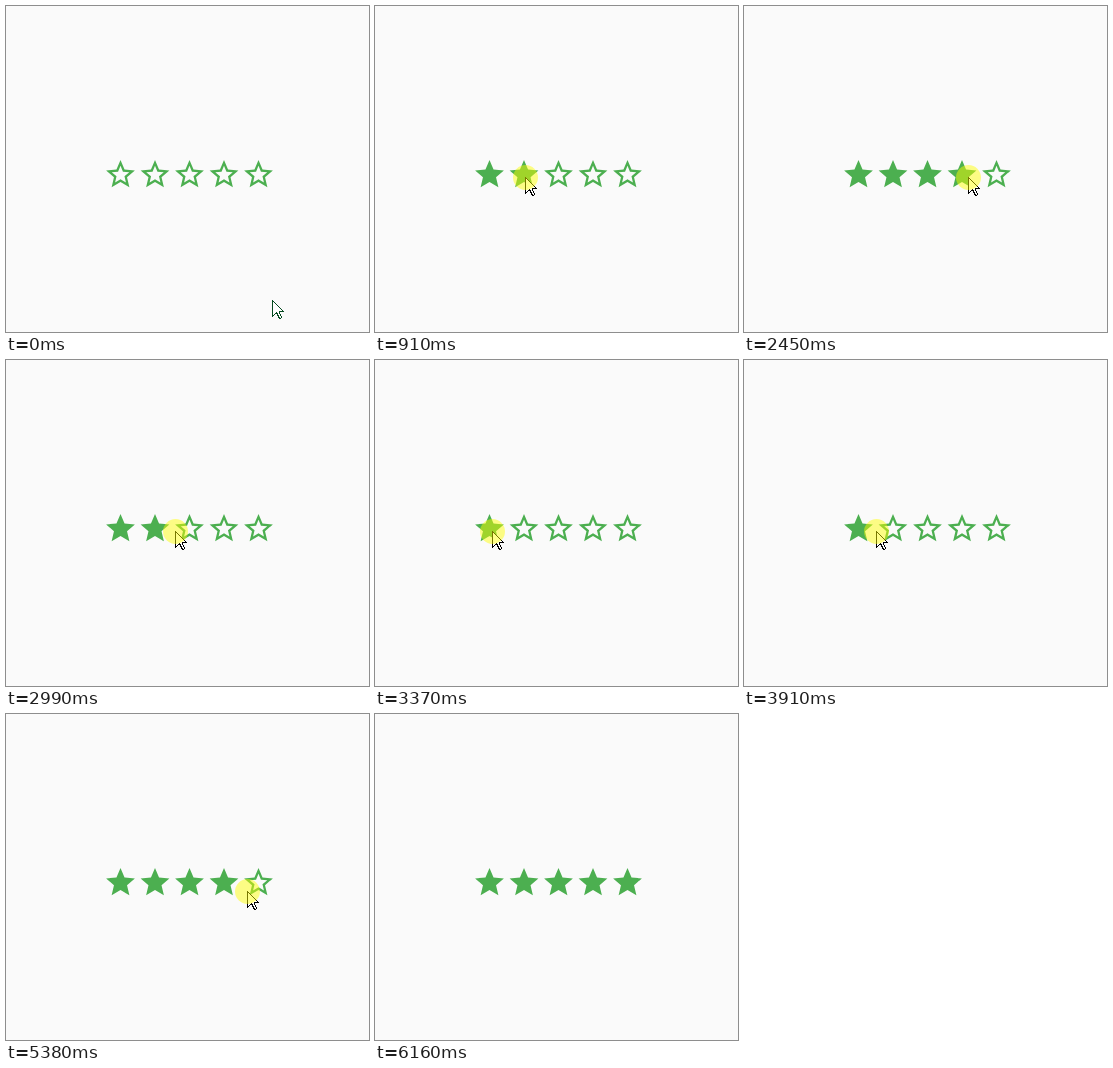
Recreate the animation shown at these times as an HTML page. Size 363x326 px, loop 6.56 s.

```html
<!DOCTYPE html>
<html lang="en">
<head>
<meta charset="utf-8">
<title>Star rating</title>
<style>
  html, body { margin: 0; width: 100%; height: 100%; overflow: hidden; background: #fafafa; }
  svg { display: block; width: 363px; height: 326px; }
</style>
</head>
<body>
<svg viewBox="0 0 363 326">
  <defs>
    <path id="star" fill="#4caf50" d="M12 17.27 18.18 21l-1.64-7.03L22 9.24l-7.19-.61L12 2 9.19 8.63 2 9.24l5.46 4.73L5.82 21z"/>
    <path id="hole" fill="#fafafa" d="M12 15.4l-3.76 2.27 1-4.28-3.32-2.88 4.38-.38L12 6.1l1.71 4.04 4.38.38-3.32 2.88 1 4.28z"/>
  </defs>
  <rect width="363" height="326" fill="#fafafa"/>
  <g id="stars"></g>
  <g id="pointer">
    <path id="arrow" d="M.5.5V16.5L4.5 12.5 7.5 18.5H8.5L9.5 17.5 7.5 12.5V11.5H11.5z" fill="#fff" shape-rendering="crispEdges"/>
    <circle id="press" cx=".5" cy=".5" r="12.5" fill="#ff0" fill-opacity=".47"/>
  </g>
</svg>
<script>
const LOOP = 6560, STEP = 76.8, LEAD = 18;
const COUNT = 5, LEFT = 97.25, TOP = 151.1, SIZE = 34.5;
const PRESS = 10, RELEASE = 78, GONE = 80;

// Key points of the drag: [step, x, y], each leg slowing down a little
const path = [
  [0, 266, 294], [6, 111, 171], [10, 111, 171], [18, 222, 171], [25, 260, 170],
  [28, 260, 170], [37, 198, 171], [46, 107, 171], [50, 106, 171], [51, 132, 171],
  [60, 178, 174], [68, 224, 175], [77, 278, 180], [79, 342, 266]
];

const $ = id => document.getElementById(id);
const clamp = (v, lo, hi) => Math.min(hi, Math.max(lo, v));
const easeOut = u => 1 - (1 - u) ** 1.5;
const show = (el, on) => el.setAttribute('visibility', on ? 'visible' : 'hidden');

function add(parent, tag, attrs) {
  const el = document.createElementNS('http://www.w3.org/2000/svg', tag);
  for (const name in attrs) el.setAttribute(name, attrs[name]);
  return parent.appendChild(el);
}

const holes = Array.from({ length: COUNT }, (_, i) => {
  const cell = add($('stars'), 'g', {
    transform: `translate(${LEFT + i * SIZE} ${TOP}) scale(${SIZE / 24})`
  });
  add(cell, 'use', { href: '#star' });
  return add(cell, 'use', { href: '#hole' });
});

function pointerAt(step) {
  const next = path.findIndex(p => p[0] > step);
  if (next < 0) return path[path.length - 1].slice(1);
  const a = path[next - 1], b = path[next];
  const u = easeOut((step - a[0]) / (b[0] - a[0]));
  return [1, 2].map(i => Math.round(a[i] + (b[i] - a[i]) * u));
}

function ratingAt(step, x) {
  if (step < PRESS) return 0;
  if (step >= RELEASE) return COUNT;
  return clamp(Math.round((x - 98) / SIZE), 0, COUNT);
}

function render(time) {
  const step = Math.floor((time % LOOP + LEAD) / STEP);
  const [x, y] = pointerAt(step);
  const rating = ratingAt(step, x);

  holes.forEach((hole, i) => show(hole, i >= rating));
  $('pointer').setAttribute('transform', `translate(${x} ${y})`);
  $('arrow').setAttribute('stroke', step < PRESS ? '#064a20' : '#000');
  show($('arrow'), step < GONE);
  show($('press'), step >= PRESS && step < RELEASE);
}

const start = performance.now();
function tick() {
  render(performance.now() - start);
  requestAnimationFrame(tick);
}
tick();
</script>
</body>
</html>
```
